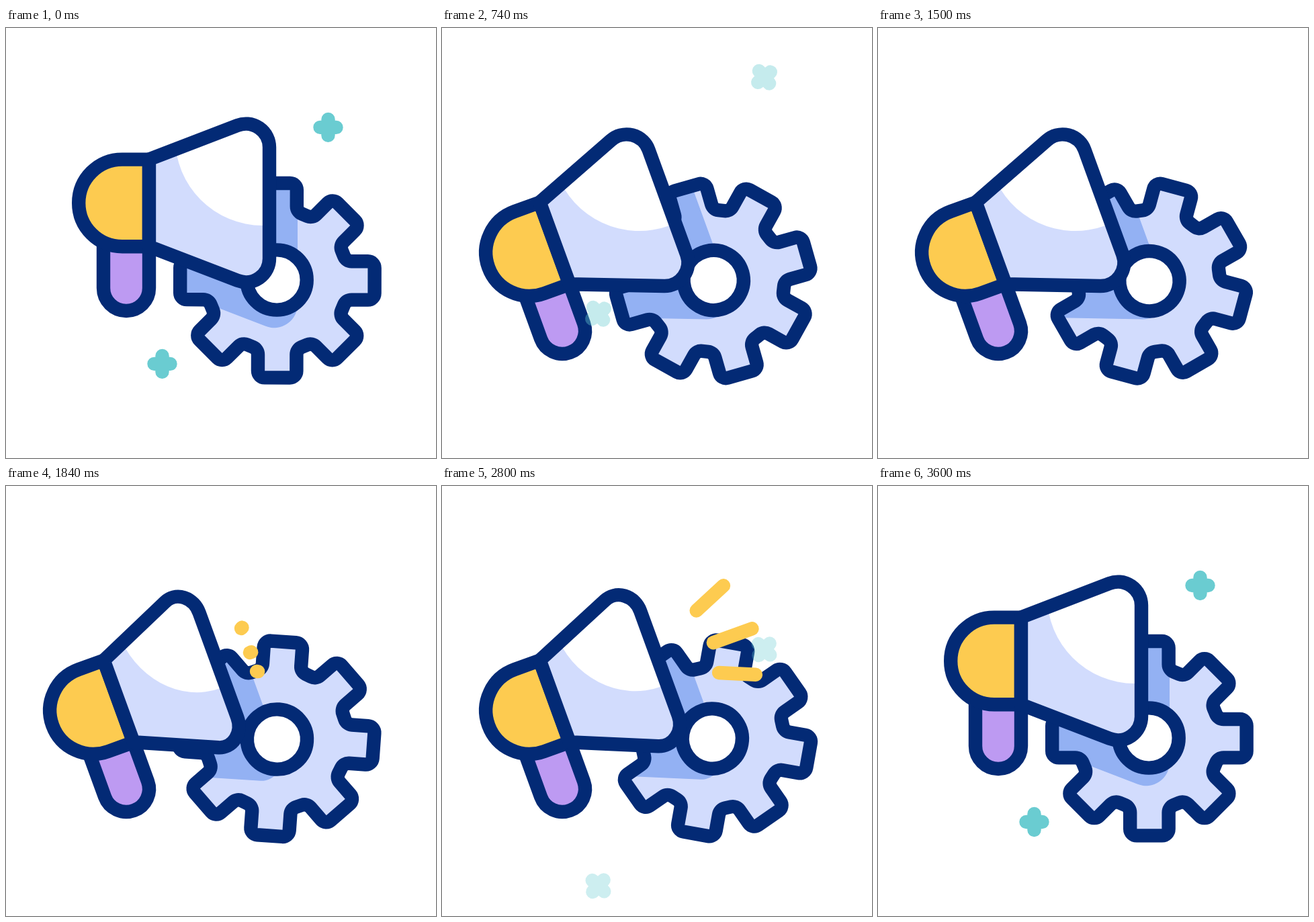
Recreate the animation shown at these times as an HTML page with a canvas. Size 640x640 px, loop 3620 ms.

```html
<!DOCTYPE html>
<html lang="en">
<head>
<meta charset="utf-8">
<title>Megaphone and gear</title>
<style>
  html, body { margin: 0; width: 100%; height: 100%; overflow: hidden; background: #fff; }
  canvas { display: block; width: 640px; height: 640px; }
</style>
</head>
<body>
<canvas id="stage" width="640" height="640"></canvas>
<script>
const ctx = document.getElementById('stage').getContext('2d');
const LOOP = 3620, ACTIVE = 3600, STROKE = 20.4;
const NAVY = '#032a75', YELLOW = '#fdcb50', PURPLE = '#bd9af2',
      LIGHT = '#d2dcfd', MID = '#93b1f3', TEAL = '#6accd1';
const PULSES = [1020, 1820, 2620];
const RAYS = [[350, 212, 446.7, 122.7], [363, 248, 501, 198], [373, 276, 504.7, 282.7]];
const STARS = [[479.5, 148], [232.5, 500]];
const BAR_X = 213;

const clamp = x => Math.min(1, Math.max(0, x));
const bezier = (u, a, b) => 3 * u * (1 - u) ** 2 * a + 3 * u * u * (1 - u) * b + u ** 3;
const ramp = (t, from, length) => bezier(clamp((t - from) / length), 0, 1);
const rad = deg => deg * Math.PI / 180;

// Closed polygon from [x, y, cornerRadius] points.
function roundPoly(points) {
  const path = new Path2D(), n = points.length;
  const [ax, ay] = points[n - 1], [bx, by] = points[0];
  path.moveTo((ax + bx) / 2, (ay + by) / 2);
  points.forEach(([x, y, r], i) => {
    const [nx, ny] = points[(i + 1) % n];
    path.arcTo(x, y, nx, ny, r);
  });
  path.closePath();
  return path;
}

function circle(x, y, r) {
  const path = new Path2D();
  path.arc(x, y, r, 0, 2 * Math.PI);
  return path;
}

function gearPath() {
  const points = [];
  const tooth = [[102.3, -28.7, 12], [144.7, -28.7, 10], [144.7, 28.7, 10], [102.3, 28.7, 12]];
  for (let i = 0; i < 8; i++) {
    const c = Math.cos(i * Math.PI / 4), s = Math.sin(i * Math.PI / 4);
    for (const [x, y, r] of tooth) points.push([x * c - y * s, x * s + y * c, r]);
  }
  return roundPoly(points);
}

// Scales a path sideways from the bar, leaving stroke widths alone.
function squeeze(path, scale) {
  const result = new Path2D();
  result.addPath(path, new DOMMatrix([scale, 0, 0, 1, BAR_X * (1 - scale), 0]));
  return result;
}

const gear = new Path2D();
gear.addPath(gearPath(), new DOMMatrix([1, 0, 0, 1, 0.6, -0.3]));
const hub = circle(-0.2, -1, 44.6);
const cap = new Path2D('M213 195.6H173A64.8 64.8 0 0 0 173 325.2H213Z');
const handle = new Path2D('M145 322V387A34 34 0 0 0 213 387V322Z');
const hornAtRest = roundPoly([
  [BAR_X, 195.6, 0], [392, 126.6, 35], [392, 394.2, 35], [BAR_X, 325.2, 0]
]);
const shineAtRest = circle(382, 163.7, 130.3);

function paint(path, fill) {
  ctx.fillStyle = fill;
  ctx.fill(path);
  ctx.strokeStyle = NAVY;
  ctx.lineWidth = STROKE;
  ctx.stroke(path);
}

function placed(draw) {
  ctx.save();
  draw();
  ctx.restore();
}

function poseMegaphone(t) {
  const turn = ramp(t, 0, 600) - ramp(t, 3000, 600);
  const drop = ramp(t, 0, 540) - ramp(t, 3060, 540);
  ctx.translate(179 - 23 * drop * (1 - drop), 387 + 64 * drop);
  ctx.rotate(rad(-20 * turn));
  ctx.translate(-179, -387);
}

function poseGear(t) {
  ctx.translate(403.3, 376);
  ctx.rotate(rad(t / 10));
}

// Clips to the turned gear but leaves the stage coordinates in place.
function clipToGear(t) {
  const stage = ctx.getTransform();
  poseGear(t);
  ctx.clip(gear);
  ctx.setTransform(stage);
}

function drawGear(t, horn) {
  placed(() => {
    poseGear(t);
    ctx.fillStyle = LIGHT;
    ctx.fill(gear);
  });
  placed(() => {
    clipToGear(t);
    poseMegaphone(t);
    ctx.translate(42, 68);
    ctx.fillStyle = MID;
    ctx.fill(horn);
  });
  placed(() => {
    poseGear(t);
    ctx.strokeStyle = NAVY;
    ctx.lineWidth = STROKE;
    ctx.stroke(gear);
    paint(hub, '#fff');
  });
}

function drawMegaphone(t, horn, shine) {
  placed(() => {
    poseMegaphone(t);
    paint(handle, PURPLE);
    paint(cap, YELLOW);
    ctx.fillStyle = LIGHT;
    ctx.fill(horn);
    placed(() => {
      ctx.clip(horn);
      ctx.fillStyle = '#fff';
      ctx.fill(shine);
    });
    ctx.stroke(horn);
  });
}

function drawRays(t) {
  ctx.strokeStyle = YELLOW;
  ctx.lineWidth = STROKE;
  for (const start of PULSES) {
    const head = ramp(t, start, 280), tail = ramp(t, start + 80, 280);
    if (head <= tail) continue;
    for (const [x1, y1, x2, y2] of RAYS) {
      ctx.beginPath();
      ctx.moveTo(x1 + (x2 - x1) * tail, y1 + (y2 - y1) * tail);
      ctx.lineTo(x1 + (x2 - x1) * head, y1 + (y2 - y1) * head);
      ctx.stroke();
    }
  }
}

function drawStars(t) {
  const leaving = t < 1200;
  if (!leaving && t <= 2400) return;
  const u = leaving ? t / 1200 : (t - 2400) / 1200;
  const shift = leaving ? -107 * bezier(u, 0.449, 0.782) : 117 * (1 - bezier(u, 0, 0.667));
  const angle = 180 * (leaving ? bezier(u, 0.4, 1) : bezier(u, 0, 0.9));
  for (const [x, y] of STARS) {
    placed(() => {
      ctx.globalAlpha = leaving ? 1 - u : u;
      ctx.translate(x, y + shift);
      ctx.rotate(rad(angle));
      ctx.strokeStyle = TEAL;
      ctx.lineWidth = STROKE;
      ctx.beginPath();
      ctx.moveTo(-12, 0);
      ctx.lineTo(12, 0);
      ctx.moveTo(0, -12);
      ctx.lineTo(0, 12);
      ctx.stroke();
    });
  }
}

function draw(t) {
  ctx.fillStyle = '#fff';
  ctx.fillRect(0, 0, 640, 640);
  ctx.lineCap = ctx.lineJoin = 'round';
  const pulse = PULSES.reduce((sum, s) =>
    sum + ramp(t, s - 120, 200) - ramp(t, s + 80, 200), 0);
  const scale = 1 - 0.15 * pulse;
  const horn = squeeze(hornAtRest, scale);
  drawGear(t, horn);
  drawMegaphone(t, horn, squeeze(shineAtRest, scale));
  drawRays(t);
  drawStars(t);
}

const begin = performance.now();
function tick() {
  draw(Math.min((performance.now() - begin) % LOOP, ACTIVE));
  requestAnimationFrame(tick);
}
tick();
</script>
</body>
</html>
```
